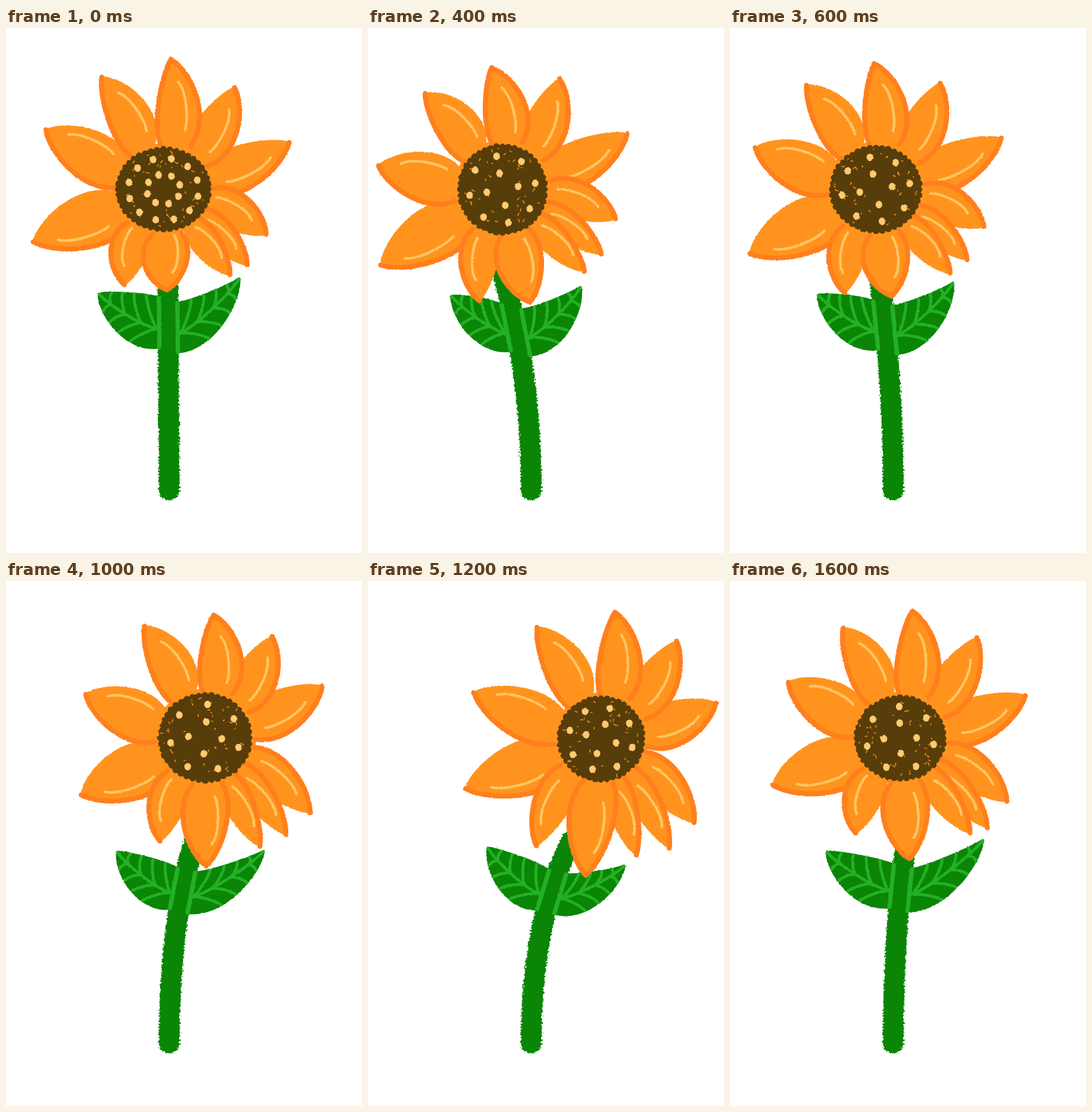
Write an HTML page that moves like this. It is 617 px wide and 908 px high and loops after 1.8 s.

```html
<!DOCTYPE html>
<html lang="en">
<head>
<meta charset="utf-8">
<title>Swaying sunflower</title>
<style>
  html, body { margin: 0; width: 100%; height: 100%; overflow: hidden; background: #fff; }
  svg { display: block; width: 617px; height: 908px; }
  path { fill: none; stroke-linecap: round; stroke-linejoin: round; }
  .petal { fill: #ff931e; stroke: #ff931e; stroke-width: 3; }
  .rim { stroke: #ff7f1c; stroke-width: 8.5; }
  .shine { stroke: #ffc563; stroke-width: 4.5; }
  .stem { stroke: #0a8506; stroke-width: 36; }
  .leaf { fill: #0a8506; stroke: #0a8506; stroke-width: 5; }
  .vein { stroke: #24b125; stroke-width: 5; }
  .edge { stroke: #24b125; stroke-width: 7.5; }
  .brown { fill: #573d09; }
  .speck { stroke: #e58a22; stroke-width: 1.8; }
  .seed { fill: #ffca70; }
</style>
</head>
<body>
<svg id="stage" viewBox="0 0 617 908">
  <defs>
    <filter id="soft" color-interpolation-filters="sRGB">
      <feTurbulence type="fractalNoise" baseFrequency=".3" numOctaves="1" seed="4"/>
      <feDisplacementMap in="SourceGraphic" scale="3" xChannelSelector="R" yChannelSelector="G"/>
    </filter>
    <filter id="furry" filterUnits="userSpaceOnUse" x="0" y="0" width="617" height="908"
        color-interpolation-filters="sRGB">
      <feTurbulence type="fractalNoise" baseFrequency=".3" numOctaves="2" seed="9"/>
      <feDisplacementMap in="SourceGraphic" scale="8" xChannelSelector="R" yChannelSelector="G"/>
    </filter>
  </defs>
</svg>
<script>
// Petals in drawing order: side of the dark rim, width on that side, width on the other.
const petals = [
  [-1, 42, 40], [-1, 42, 34], [-1, 25, 41], [1, 43, 15], [1, 44, 23], [-1, 42, 17],
  [-1, 29, 16], [-1, 22, 21], [1, 47, 18], [1, 49, 16], [-1, 34, 36]];

// hub: centre and radii; tips: petal tips seen from the hub; leaves: both leaf tips;
// neck: top of the stem; seeds: outer ring, inner ring, turn.
const upright = {
  hub: [273, 279, 84, 74], neck: [280, 395], leaves: [161, 460, 404, 434], seeds: [12, 8, -1.87],
  tips: [-226, 91, -204, -103, -107, -194, -68, 165, 218, -81, 178, 78,
    145, 131, 115, 148, 123, -176, 13, -225, 6, 174] };
const farLeft = {
  hub: [233, 279, 79, 80], neck: [231, 415], leaves: [145, 464, 368, 449], seeds: [8, 4, -1.75],
  tips: [-211, 131, -215, -41, -134, -166, -40, 193, 216, -96, 196, 51,
    171, 112, 142, 142, 99, -191, -19, -210, 48, 195] };
const right = {
  hub: [295, 272, 81, 75], neck: [308, 435], leaves: [168, 469, 438, 449], seeds: [7, 4, -1.6],
  tips: [-221, 81, -194, -97, -99, -191, -77, 164, 217, -74, 185, 109,
    151, 155, 121, 164, 133, -174, 21, -220, 16, 208] };
const fartherRight = {
  hub: [345, 271, 83, 79], neck: [328, 445], leaves: [193, 469, 446, 468], seeds: [7, 4, -1.5],
  tips: [-215, 99, -207, -75, -105, -193, -78, 179, 203, -89, 182, 130,
    140, 168, 95, 188, 116, -175, 15, -212, 2, 222] };
const farRight = {
  hub: [404, 273, 77, 75], neck: [352, 450], leaves: [208, 462, 444, 493], seeds: [8, 4, -1.3],
  tips: [-235, 86, -221, -80, -111, -193, -112, 185, 199, -62, 161, 145,
    118, 189, 61, 201, 131, -169, 24, -219, -27, 236] };

const blend = (a, b) => a.map((v, i) => (v + b[i]) / 2);
const left = { seeds: farLeft.seeds };
for (const k of ['hub', 'neck', 'leaves', 'tips']) left[k] = blend(upright[k], farLeft[k]);

const stage = document.getElementById('stage');

function add(parent, tag, attrs) {
  const el = document.createElementNS(stage.namespaceURI, tag);
  for (const k in attrs) el.setAttribute(k, attrs[k]);
  return parent.appendChild(el);
}
const draw = (g, cls, d) => add(g, 'path', { class: cls, d });
const blob = (g, cls, cx, cy, rx, ry = rx) => add(g, 'ellipse', { class: cls, cx, cy, rx, ry });

// Cubic from a to b that swells sideways by h, blunter towards b.
function bow(a, b, h) {
  const dx = b[0] - a[0], dy = b[1] - a[1], len = Math.hypot(dx, dy);
  const at = (t, k) => [a[0] + dx * t - dy / len * h * k, a[1] + dy * t + dx / len * h * k];
  return [a, at(.25, 1.6), at(.8, 1.07), b];
}
const curve = ([a, b, c, d]) => `M${a}C${b} ${c} ${d}`;
const blade = ([a, b, c, d], [e, f, g]) => `M${a}C${b} ${c} ${d}C${g} ${f} ${e}`;

function pointOn([a, b, c, d], t) {
  const s = 1 - t;
  return a.map((v, i) =>
    s * s * s * v + 3 * s * s * t * b[i] + 3 * s * t * t * c[i] + t * t * t * d[i]);
}

function random(seed) {
  return () => (seed = seed * 16807 % 2147483647) / 2147483647;
}

function drawLeaf(g, stem, tip, side) {
  const t = side < 0 ? .75 : .73;
  const [top, low, root] = [.1, -.09, -.02].map(d => {
    const [x, y] = pointOn(stem, t + d);
    return [x + side * 16, y];
  });
  const upper = bow(top, tip, 4), lower = bow(low, tip, side * 27);
  const spine = bow(root, tip, side * 7);
  draw(g, 'leaf', blade(upper, lower) + 'Z');
  draw(g, 'vein', curve(spine));
  for (const v of [.04, .28, .5, .72]) {
    const from = pointOn(spine, v);
    draw(g, 'vein', curve(bow(from, pointOn(upper, .2 + .76 * v), side * 3)));
    draw(g, 'vein', curve(bow(from, pointOn(lower, .3 + .66 * v), side * -3)));
  }
  draw(g, 'edge', `M${top}L${low}`);
}

function drawPetal(g, [x, y, rx, ry], dx, dy, i) {
  const [side, dark, pale] = petals[i];
  const len = Math.hypot(dx, dy), ux = dx / len, uy = dy / len, r = (rx + ry) / 2 - 2;
  // Along the petal and across it, positive towards the dark rim.
  const at = (along, across) =>
    [x + ux * along - uy * across * side, y + uy * along + ux * across * side];
  const tip = at(len, 0);
  const near = bow(at(r, dark * .85), tip, side * dark * .6);
  const far = bow(at(r, -pale * .6), tip, -side * pale * .75);
  draw(g, 'petal', blade(near, far) + `L${x} ${y}Z`);
  draw(g, 'rim', i > 8 ? blade(near, far) : curve(near));

  const flip = pale > 33 && dark < 43 && i > 0 && i < 3 ? -1 : 1;
  const w = flip > 0 ? dark : pale;
  const start = at(len * .83, flip * w * .3), end = at(len * .46, flip * (w - 18));
  draw(g, 'shine', curve(bow(start, end, -side * flip * 8)));
}

function drawHub(g, [x, y, rx, ry], [outer, inner, turn]) {
  const rnd = random(Math.round(x * 31 + y));
  const polar = (a, r) => [x + Math.cos(a) * rx * r, y + Math.sin(a) * ry * r];
  blob(g, 'brown', x, y, rx - 3, ry - 3);
  for (let i = 0; i < 44; i++) blob(g, 'brown', ...polar(i * Math.PI / 22, .93), 4.6 + rnd() * 1.6);
  for (let i = 0; i < 46; i++) {
    const [px, py] = polar(rnd() * 2 * Math.PI, .25 + .65 * Math.sqrt(rnd()));
    const a = rnd() * 6, len = 1 + rnd() * 4;
    draw(g, 'speck', `M${px} ${py}l${Math.cos(a) * len} ${Math.sin(a) * len}`);
  }
  for (const [n, r] of [[outer, .73], [inner, .35]])
    for (let i = 0; i < n; i++) blob(g, 'seed', ...polar(turn + i * 2 * Math.PI / n, r), 5.8, 6.4);
}

function makePose({ hub, neck, leaves, seeds, tips }) {
  const pose = add(stage, 'g', { display: 'none' });
  const stem = [[283, 799], [283, 690], [283 + (neck[0] - 283) * .2, 560], neck];
  draw(add(pose, 'g', { filter: 'url(#furry)' }), 'stem', curve(stem));
  const g = add(pose, 'g', { filter: 'url(#soft)' });
  drawLeaf(g, stem, leaves.slice(0, 2), -1);
  drawLeaf(g, stem, leaves.slice(2), 1);
  blob(g, 'petal', hub[0], hub[1], hub[2] + 4, hub[3] + 4);
  petals.forEach((_, i) => drawPetal(g, hub, tips[2 * i], tips[2 * i + 1], i));
  drawHub(g, hub, seeds);
  return pose;
}

const [A, B, C, D, E, F] =
  [upright, left, farLeft, right, fartherRight, farRight].map(makePose);
const order = [A, B, C, B, D, E, F, E, D];
const STEP = 200;
let shown;

function tick() {
  const pose = order[Math.floor(performance.now() / STEP) % order.length];
  if (pose !== shown) {
    if (shown) shown.setAttribute('display', 'none');
    pose.removeAttribute('display');
    shown = pose;
  }
  requestAnimationFrame(tick);
}
tick();
</script>
</body>
</html>
```
